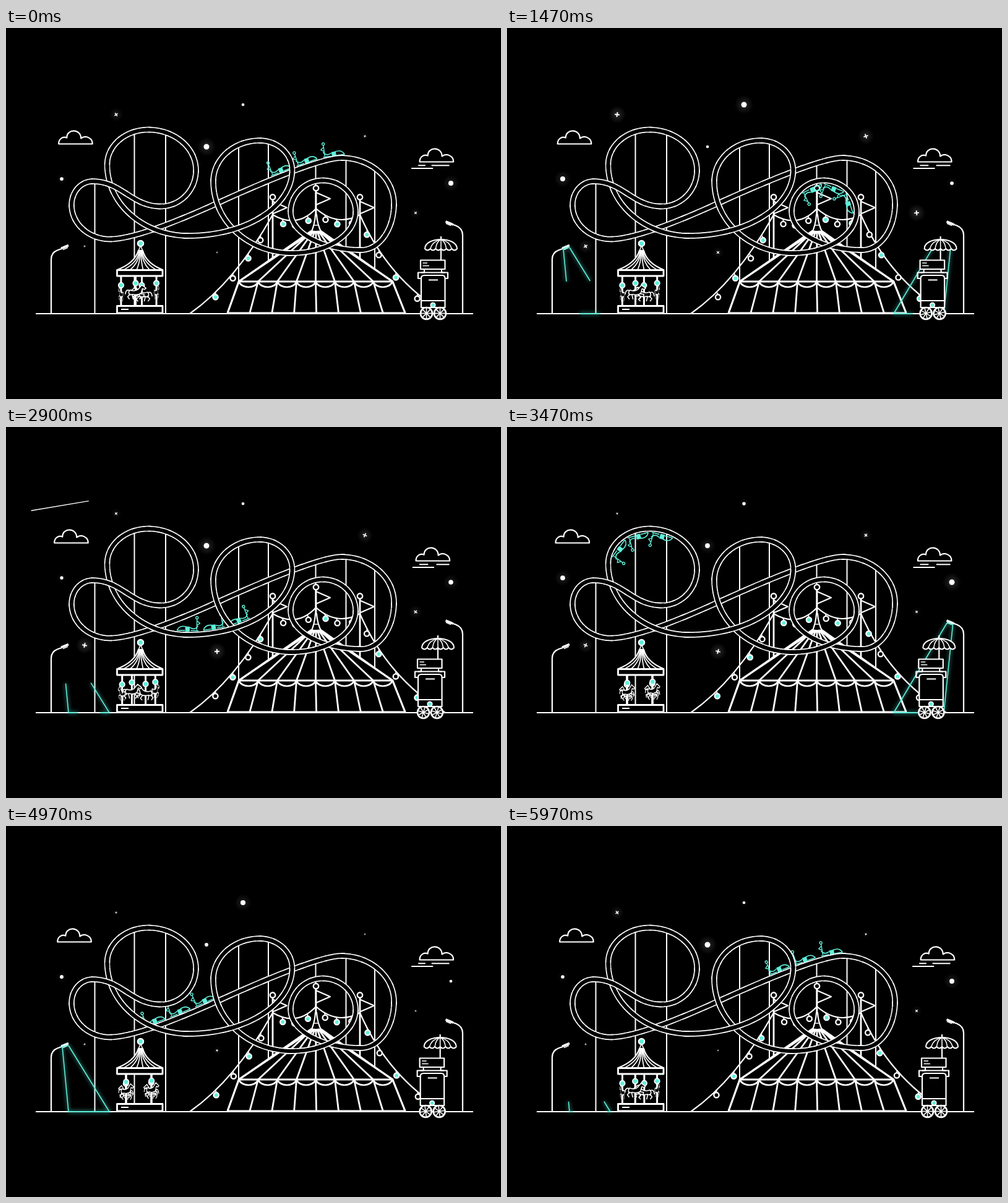
An HTML page with a canvas for the animation above (6010 ms loop, 800 px wide and 600 px high).

```html
<!DOCTYPE html>
<html lang="en">
<head>
<meta charset="utf-8">
<title>Night fair</title>
<style>
html, body { margin: 0; width: 100%; height: 100%; overflow: hidden; background: #000; }
canvas { display: block; }
</style>
</head>
<body>
<canvas id="stage" width="800" height="600"></canvas>
<script>
const ctx = document.getElementById('stage').getContext('2d');
const LOOP = 6010, HALF = LOOP / 2, TAU = Math.PI * 2;
const WHITE = '#fff', MINT = '#5ff0da';
const clamp = (v, lo = 0, hi = 1) => Math.max(lo, Math.min(hi, v));
const mix = (a, b, k) => a + (b - a) * k;
const wave = (t, peak, period) => Math.cos(TAU * (t - peak) / period);

// ---------- drawing helpers ----------
function path(d, w = 2.4, color = WHITE, fill) {
  const p = new Path2D(d);
  if (fill) { ctx.fillStyle = fill; ctx.fill(p); }
  ctx.lineWidth = w;
  ctx.strokeStyle = color;
  ctx.stroke(p);
}
function line(x1, y1, x2, y2, w = 2.4, color = WHITE) {
  ctx.lineWidth = w;
  ctx.strokeStyle = color;
  ctx.beginPath();
  ctx.moveTo(x1, y1);
  ctx.lineTo(x2, y2);
  ctx.stroke();
}
function disc(x, y, r, fill) {
  ctx.beginPath();
  ctx.arc(x, y, r, 0, TAU);
  ctx.fillStyle = fill;
  ctx.fill();
}
function ring(x, y, r, fill = '#000', w = 2.4) {
  disc(x, y, r, fill);
  ctx.lineWidth = w;
  ctx.strokeStyle = WHITE;
  ctx.stroke();
}
function halo(x, y, r, alpha) {
  const g = ctx.createRadialGradient(x, y, 0, x, y, r);
  g.addColorStop(0, `rgba(255,255,255,${alpha})`);
  g.addColorStop(1, 'rgba(255,255,255,0)');
  disc(x, y, r, g);
}
function shifted(dx, dy, draw) {
  ctx.save();
  ctx.translate(dx, dy);
  draw();
  ctx.restore();
}

// ---------- track: key points with a heading in degrees ----------
const knots = [
  [542, 210, 0], [627, 284, 90], [574, 359, 180],
  [460, 297, 270], [512, 246.5, 0], [565, 297, 90], [462, 364, 180],
  [335, 248, 270], [410, 182, 0], [462.5, 230, 90], [295, 336, 180],
  [163.5, 221, 270], [230, 164.5, 0], [307, 230, 90], [250, 288.5, 180],
  [140, 248, 180], [106, 286, 90], [168, 341.5, 0], [340, 284, -24.5]
];
const COUNT = knots.length, STEP = 48, TOTAL = COUNT * STEP;

// Handles follow an elliptic arc toward the point where both tangents meet.
function handles([ax, ay, ah], [bx, by, bh]) {
  const rad = Math.PI / 180, dx = bx - ax, dy = by - ay;
  const [cA, sA, cB, sB] = [Math.cos(ah * rad), Math.sin(ah * rad), Math.cos(bh * rad), Math.sin(bh * rad)];
  const det = cA * sB - sA * cB;
  let p = 0.4 * Math.hypot(dx, dy), q = p;
  if (Math.abs(det) > 0.01) {
    const turn = Math.abs(Math.asin(clamp(det, -1, 1)));
    const k = 4 / 3 * Math.tan(turn / 4) / Math.tan(turn / 2);
    p = k * (dx * sB - dy * cB) / det;
    q = k * (cA * dy - sA * dx) / det;
  }
  return [[ax + cA * p, ay + sA * p], [bx - cB * q, by - sB * q]];
}
const track = [], dist = [0];
knots.forEach((a, i) => {
  const b = knots[(i + 1) % COUNT], [h, g] = handles(a, b);
  for (let n = 0; n < STEP; n++) {
    const u = n / STEP, w = 1 - u;
    track.push([0, 1].map(c => w * w * w * a[c] + 3 * w * w * u * h[c] + 3 * w * u * u * g[c] + u * u * u * b[c]));
  }
});
track.forEach((a, i) => {
  const b = track[(i + 1) % TOTAL];
  dist.push(dist[i] + Math.hypot(b[0] - a[0], b[1] - a[1]));
});
const LENGTH = dist[TOTAL];
const wrap = s => ((s % LENGTH) + LENGTH) % LENGTH;

function lengthAt(u) {
  return Math.floor(u / COUNT) * LENGTH + dist[Math.round((u % COUNT) * STEP)];
}
function pointAt(s) {
  s = wrap(s);
  let lo = 0, hi = TOTAL;
  while (hi - lo > 1) {
    const mid = (lo + hi) >> 1;
    if (dist[mid] <= s) lo = mid; else hi = mid;
  }
  const f = (s - dist[lo]) / (dist[lo + 1] - dist[lo]);
  return [0, 1].map(c => mix(track[lo][c], track[(lo + 1) % TOTAL][c], f));
}

// Rails go down piece by piece so later pieces cross over earlier ones.
const rails = document.createElement('canvas');
rails.width = 800;
rails.height = 600;
(function layRails() {
  const r = rails.getContext('2d');
  const piece = (from, to, w, color) => {
    r.beginPath();
    for (let i = from; i <= to; i++) r.lineTo(...track[(i + TOTAL) % TOTAL]);
    r.lineWidth = w;
    r.strokeStyle = color;
    r.stroke();
  };
  const start = 17 * STEP;
  for (let i = start; i < start + TOTAL; i += 12) {
    piece(i, i + 14, 9.4, WHITE);
    piece(i - 2, i + 16, 6, '#000');
  }
})();

// ---------- train: time and knot position of the front car ----------
const ride = [[0, 0.04], [1470, 5], [2370, 8.1], [3470, 12.33], [4370, 15.7], [4970, 18], [LOOP, COUNT + 0.04]]
  .map(([t, u]) => ({ t, s: lengthAt(u), v: 0.11 }));
for (let i = 1; i < ride.length - 1; i++) {
  ride[i].v = (ride[i + 1].s - ride[i - 1].s) / (ride[i + 1].t - ride[i - 1].t);
}
function trainAt(t) {
  const i = ride.findIndex(key => key.t > t), a = ride[i - 1], b = ride[i];
  const h = b.t - a.t, u = (t - a.t) / h, w = 1 - u;
  return w * w * (1 + 2 * u) * a.s + u * u * (3 - 2 * u) * b.s + h * u * w * (w * a.v - u * b.v);
}
// The cars roll to the other side of the rail at both outer turns.
const flipRight = lengthAt(1), flipLeft = lengthAt(16);
function sideAt(s) {
  s = wrap(s);
  return clamp(Math.max(flipRight - s, s - flipLeft) / 16, -1, 1) || 0.01;
}
function car(s) {
  const [fx, fy] = pointAt(s), [bx, by] = pointAt(s - 34);
  ctx.save();
  ctx.translate(fx, fy);
  ctx.rotate(Math.atan2(fy - by, fx - bx));
  ctx.scale(1, sideAt(s - 17));
  path('M-35 -6H-22M-13 -6H0', 1.6, MINT);
  path('M-34 -14Q-29 -6 -21 -11', 1.6, MINT);
  path('M-20 -5V-12H-14V-5Z', 1.2, MINT, MINT);
  path('M-15 -12Q-4 -15 0 -6', 1.6, MINT);
  path('M-32 -7V-25M-32 -22L-37 -18L-32 -15', 1.4, MINT);
  path('M-34 -27a2 2 0 1 0 4 0a2 2 0 1 0 -4 0', 1.4, MINT);
  ctx.restore();
}

// ---------- sky: neighbours in each list peak one after another ----------
const dots = [[324, 192], [719, 251], [90, 244], [383, 124]];
const sparks = [[178, 140], [662, 299], [580, 175], [127, 353], [341, 363]];
function sky(t) {
  dots.forEach(([x, y], i) => {
    const k = wave(t, 530 * i - 55, HALF), r = 3.4 + 1.1 * k;
    halo(x, y, r * 3.4, 0.09 + 0.07 * k);
    disc(x, y, r, WHITE);
  });
  sparks.forEach(([x, y], i) => {
    const peak = 1200 + 450 * i, k = wave(t, peak, LOOP), r = 2.7 + 1.3 * k;
    halo(x, y, r * 3.6, 0.09 + 0.08 * k);
    shifted(x, y, () => {
      ctx.rotate(Math.PI * (t - peak) / LOOP);
      line(-r, 0, r, 0, r * 0.5);
      line(0, -r, 0, r, r * 0.5);
    });
  });
  const p = (t - 2490) / 420;
  if (p > 0 && p < 1) {
    const at = k => [mix(800, 24, k), mix(8, 138, k)];
    line(...at(p), ...at(Math.max(0, p - 0.12)), 1.4);
  }
}
function clouds(t) {
  const shape = 'M0 21C-.5 14 6 8 13 11C13 -4 36 -4 36 12C44 6 55 12 54.5 21Z';
  const c = wave(t, 5500, LOOP);
  shifted(81.7 + 3.5 * wave(t, 0, LOOP), 166.5, () => path(shape, 2.2));
  shifted(665.7 + 3.4 * c, 195.5, () => path(shape, 2.2));
  line(667 - c, 222.3, 680 - 2.5 * c, 222.3, 2);
  line(691.5 - 4.5 * c, 222.3, 716.5, 222.3, 2);
  line(656 - c, 227, 691 - c, 227, 2);
}

// ---------- fairground ----------
const posts = [143.5, 207.5, 258, 376, 424, 500.5, 549.5, 596].map(x => {
  const near = track.filter(p => Math.abs(p[0] - x) < 4).map(p => p[1]);
  return [x, Math.min(...near)];
});
function flagPole(x, y, end) {
  line(x, y + 4, x, end, 2.8);
  path(`M${x} ${y + 7}l23 10l-23 10`, 2);
  ring(x, y, 4.2);
}
function tent() {
  flagPole(431, 273.5, 380);
  flagPole(572, 273.5, 380);
  flagPole(501, 259, 306);
  path('M494 331L376 410L358 461H645L625 410L508 331Z', 2.8, WHITE, '#000');
  path('M500 302Q499 318 493 331H510Q503 318 502 302Z', 2.2, WHITE, '#000');
  line(497, 319, 505, 319, 1.5);
  for (let i = 0; i < 9; i++) {
    const x = 376.5 + i * 31;
    line(501 + (i - 4) * 1.8, 328, x, 410, 2.8);
    line(x, 410, 358 + i * 35.9, 461, 2.8);
    if (i < 8) path(`M${x} 410c4 12 27 12 31 0`, 2.6, WHITE, '#000');
  }
  line(375, 410, 626, 410, 3);
}

// Each strand: three curve points, bulb count, first and last place, light phase, sway.
const strands = [
  { a: [431, 302], c: [371, 410], b: [297, 462], n: 4, from: 0.16, to: 0.71, odd: 1, sway: 1.5 },
  { a: [431, 302], c: [470, 325], b: [501, 292], n: 3, from: 0.2, to: 0.78, odd: 0, sway: -0.9 },
  { a: [501, 292], c: [535, 322], b: [572, 302], n: 3, from: 0.2, to: 0.8, odd: 1, sway: -0.9 },
  { a: [572, 302], c: [617, 406], b: [710, 462], n: 4, from: 0.12, to: 0.74, odd: 0, sway: 1.5 }
];
function garlands(t) {
  const beat = Math.floor(t / (LOOP / 8)), swing = -wave(t, -0.1 * HALF, HALF);
  for (const { a, b, c, n, from, to, odd, sway } of strands) {
    path(`M${a}Q${c} ${b}`, 2.2);
    for (let i = 0; i < n; i++) {
      const u = mix(from, to, (i / (n - 1)) ** 1.15), w = 1 - u;
      const [x, y] = [0, 1].map(k => w * w * a[k] + 2 * w * u * c[k] + u * u * b[k]);
      const bx = x + 1 + sway * swing;
      line(x, y, bx, y + 4, 1.8);
      ring(bx, y + 8, 4.1, (i + odd + beat) % 2 ? '#000' : MINT);
    }
  }
}

function horse(a) {
  const x = 214.5 + 29 * Math.sin(a), y = 414.4 - 2.4 * Math.cos(a - 0.6);
  const c = Math.cos(a);
  line(x, 402, x, 449, 3);
  ctx.save();
  ctx.translate(x, y);
  ctx.scale(Math.sign(c) * Math.max(0.25, Math.abs(c)), 1);
  path('M-9 11Q-2 14 4 10L10 3L17 8L15 10L11 9L9 16Q5 20 -5 18L-10 19Q-13 14 -9 11Z', 1.6, WHITE, '#000');
  path('M8 17L14 18L13 23M5 18L9 23L6 26M-9 17L-13 22L-10 26M-6 18L-4 26M-10 12Q-16 9 -17 18', 1.6);
  ctx.restore();
  ring(x, y, 4.2, MINT, 1.8);
}
function carousel(t) {
  const turn = TAU * (2 * t / LOOP - 10 / 360);
  [0, 1, 2, 3].map(k => turn + k * TAU / 4)
    .sort((a, b) => Math.cos(a) - Math.cos(b)).forEach(horse);
  path('M214 360Q208 380 180 391H253Q226 380 221 360Z', 2.2, WHITE, '#000');
  for (let i = 1; i < 7; i++) path(`M${214 + i} 360Q${213 + i * 1.3} 378 ${180 + i * 10.4} 391`, 1.7);
  path('M217.5 352L213 363H222Z', 1.6);
  ring(217.5, 348.5, 4.6, MINT);
  path('M179.5 391.5H253V401H179.5Z', 2.8, WHITE, '#000');
  path('M179.5 449.5H253V461H179.5Z', 2.8, WHITE, '#000');
  line(186, 455, 198, 455, 2);
}

function wheel(x, a) {
  ring(x, 461.5, 9.5, '#000', 2.6);
  for (let k = 0; k < 4; k++) {
    const dx = 9 * Math.cos(a + k * TAU / 8), dy = 9 * Math.sin(a + k * TAU / 8);
    line(x - dx, 461.5 - dy, x + dx, 461.5 + dy, 1.6);
  }
}
function cart(t) {
  const dx = -2.5 + 2.5 * wave(t, 0, LOOP), rib = 52 / 6;
  shifted(dx, 0, () => {
    line(703, 337, 703, 375, 2.2);
    path(`M729 357${`q${-rib / 2} 5 ${-rib} 0`.repeat(6)}C677 337 729 337 729 357Z`, 2, WHITE, '#000');
    for (let i = 1; i < 6; i++) {
      const x = 677 + i * rib;
      path(`M703 342Q${mix(x, 703, 0.2)} 345 ${x} 357`, 1.6);
    }
    path('M670 375.5H709.5V390H670Z', 2.2, WHITE, '#000');
    path('M673.5 380H681M673.5 384.5H684', 1.7);
    path('M676 390V395.5H666V405H671M704 390V395.5H714V405H709', 2.2);
    path('M676 400H705Q709.5 400 709.5 405V452H671V405Q671 400 676 400Z', 2.2, WHITE, '#000');
    path('M671 395.5H709M671 441H709.5M683 407.5H698', 2);
    ring(690, 448, 3.7, MINT, 1.8);
    wheel(679.5, dx / 10);
    wheel(701.5, dx / 10);
  });
}

// ---------- street lamps ----------
function lamps() {
  path('M73 461V374Q73 363 84 359L90 357', 2.2);
  line(89, 356.5, 101, 351.5, 3.6);
  line(92, 358.5, 100, 355, 1.5);
  path('M738 461V335Q738 324 727 319.5L721 317.5', 2.2);
  line(710.5, 313, 722.5, 318, 3.6);
  line(711, 316, 719, 319.5, 1.5);
}
// Light runs down from the lamp while the ground line opens from its middle.
function beam(a, b, left, right, time) {
  const grow = clamp(time / 200), fade = clamp((time - 1410) / 220);
  if (grow === 0 || fade === 1) return;
  const side = ([x, y], foot) => {
    const at = k => [mix(x, foot, k), mix(y, 462, k)];
    line(...at(fade), ...at(grow), 1.6, MINT);
  };
  ctx.save();
  ctx.shadowColor = MINT;
  ctx.shadowBlur = 6;
  side(a, left);
  side(b, right);
  if (!fade) line(...a, ...b, 1.4, MINT);
  const mid = (left + right) / 2, reach = (right - left) / 2;
  for (const dir of [-1, 1]) {
    line(mid + dir * reach * fade, 462, mid + dir * reach * grow, 462, 1.8, MINT);
  }
  ctx.restore();
}

function draw(t) {
  ctx.fillStyle = '#000';
  ctx.fillRect(0, 0, 800, 600);
  ctx.lineJoin = 'round';
  sky(t);
  clouds(t);
  for (const [x, y] of posts) line(x, y, x, 461, 2);
  tent();
  garlands(t);
  const s = trainAt(t);
  for (let k = 0; k < 3; k++) car(s - k * 44);
  ctx.drawImage(rails, 0, 0);
  carousel(t);
  line(48, 462, 755, 462, 2.2);
  lamps();
  beam([91, 357], [101, 355], 101, 167, t % HALF - 1370);
  beam([711, 317], [720.5, 320], 625, 706, t % HALF - 10);
  cart(t);
}
function tick(now) {
  draw(now % LOOP);
  requestAnimationFrame(tick);
}
draw(0);
requestAnimationFrame(tick);
</script>
</body>
</html>
```
